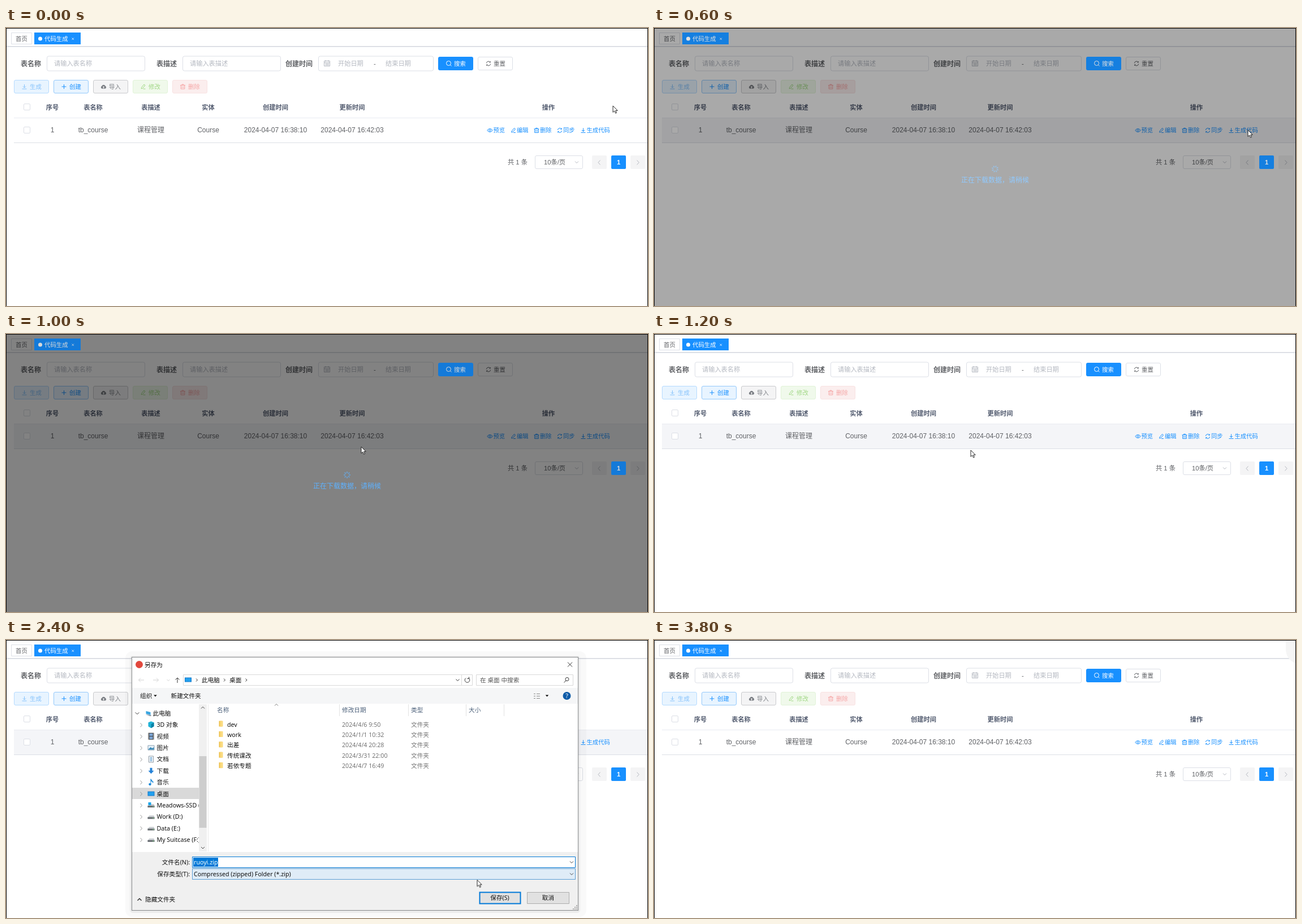
These frames come from a looping animation (1135 by 493 pixels, 4.6 s). An HTML page:

```html
<!DOCTYPE html>
<html lang="zh-CN">
<head>
<meta charset="utf-8">
<title>代码生成</title>
<style>
html, body { margin: 0; width: 100%; height: 100%; overflow: hidden; background: #fff; }
svg { display: block; width: 1135px; height: 493px; }
text { font: 11.2px "Liberation Sans", "Noto Sans CJK SC", "Noto Sans CJK", sans-serif; fill: #606266; white-space: pre; }
.m { text-anchor: middle; }
.e { text-anchor: end; }
.b { font-weight: bold; }
.s { font-size: 10.4px; }
.l { font-size: 12px; }
.ph { fill: #b4b8c0; }
.head { fill: #515a6e; font-weight: bold; }
.link text { fill: #1890ff; font-size: 10.3px; }
.w { fill: #fff; }
.ico { fill: none; stroke-width: 1; stroke: currentColor; }
.box { fill: #fff; stroke: #dcdfe6; }
#dialog text { font: 10.65px "Noto Sans", "Noto Sans CJK SC", "Noto Sans CJK", sans-serif; fill: #111; }
#dialog .dim { fill: #747474; }
#dialog .col { fill: #4c607a; }
#dialog .w { fill: #fff; }

#hover, #load, #vivid, #dialog, #pick, #twist, #combo, #save, #title, #brand, #bubble, #cursor {
  animation: 4.6s step-end infinite;
}
#hover { animation-name: hover; }
#load { animation-name: load; }
#vivid { animation-name: vivid; }
#dialog { animation-name: dialog; transform-origin: 617px 255px; }
#pick { animation-name: pick; }
#twist { animation-name: twist; }
#combo { animation-name: combo; }
#save { animation-name: save; }
#title { animation-name: title; }
#brand { animation-name: brand; }
#bubble { animation-name: bubble; }
#cursor { animation-name: cursor; }
#spin { transform-origin: 603px 250px; animation: spin 2s steps(10) infinite; }

@keyframes spin { to { transform: rotate(360deg); } }
@keyframes hover {
  0%, 78.26% { opacity: 0; }
  4.347% { opacity: 1; }
  73.913% { opacity: .5; }
}
@keyframes load {
  0%, 26.086% { opacity: 0; }
  13.043% { opacity: .48; }
  17.391% { opacity: .9; }
  21.739% { opacity: .7; }
}
@keyframes vivid {
  0%, 26.086% { filter: none; }
  13.043% { filter: brightness(.88); }
  17.391% { filter: brightness(.8); }
  21.739% { filter: brightness(.85); }
}
@keyframes dialog {
  0%, 73.913% { visibility: hidden; transform: none; }
  34.782% { visibility: visible; transform: scale(.9966); }
  39.13% { visibility: visible; transform: none; }
}
@keyframes pick { 0% { opacity: 1; } 43.478% { opacity: 0; } }
@keyframes twist {
  0%, 65.217% { opacity: 0; }
  43.478% { opacity: .6; }
  47.826% { opacity: 1; }
  56.521% { opacity: .7; }
  60.869% { opacity: .3; }
}
@keyframes combo {
  0%, 65.217% { opacity: 0; }
  52.173% { opacity: 1; }
  56.521% { opacity: .6; }
  60.869% { opacity: .2; }
}
@keyframes save {
  0% { fill: #e1e1e1; stroke: #0078d7; stroke-width: 2px; }
  56.521% { fill: #e5f1fb; stroke: #0078d7; stroke-width: 1px; }
  69.565% { fill: #cce4f7; stroke: #005499; stroke-width: 1px; }
}
@keyframes title { 0% { transform: none; } 69.565% { transform: translateX(-16px); } }
@keyframes brand { 0% { opacity: 1; } 69.565% { opacity: .08; } }
@keyframes bubble { 0% { opacity: 0; } 78.26% { opacity: 1; } }
@keyframes cursor {
  0% { transform: translate(1073px, 138px); }
  4.347% { transform: translate(1056px, 183px); }
  8.695% { transform: translate(1050px, 181px); }
  17.391% { transform: translate(850px, 190px); }
  21.739% { transform: translate(628px, 200px); }
  26.086% { transform: translate(560px, 206px); }
  30.434% { transform: translate(480px, 208.5px); }
  39.13% { transform: translate(500px, 230px); }
  43.478% { transform: translate(560px, 300px); }
  47.826% { transform: translate(684px, 379px); }
  52.173% { transform: translate(833px, 425.5px); opacity: 1; }
  56.521% { transform: translate(867px, 453px); }
  65.217% { transform: translate(867px, 457px); opacity: 1; }
  73.913%, 100% { transform: translate(867px, 457px); opacity: 0; }
}
</style>
</head>
<body>
<svg viewBox="0 0 1135 493">
  <defs>
    <clipPath id="treeClip"><path d="M223 114H341V375H223Z"/></clipPath>
    <g id="down" class="ico"><path d="M0-4V2M-2.5-.5L0 2L2.5-.5M-4 4H4"/></g>
    <g id="pen" class="ico"><path d="M-3 1.5L1.5-4L3.5-2.3L-1 3L-3.3 3.5ZM0 4H4"/></g>
    <g id="bin" class="ico"><path d="M-4.5-2.5H4.5M-3.3-2.5V4H3.3V-2.5M-1.5-2.5V-4H1.5V-2.5M-1.2-.5V2.3M1.2-.5V2.3"/></g>
    <g id="sync" class="ico"><path d="M-3.6-.6A3.6 3.6 0 0 1 3-2.3M3.3-4V-2H1.3M3.6.6A3.6 3.6 0 0 1-3 2.3M-3.3 4V2H-1.3"/></g>
    <g id="eye" class="ico"><path d="M-4.8 0Q0-6 4.8 0Q0 6-4.8 0Z"/><circle r="1.6"/></g>
    <path id="chev" d="M-3-1.5L0 1.5L3-1.5" class="ico"/>
    <path id="tri" d="M-2.8-1.5H2.8L0 1.6Z"/>
    <g id="screen"><path d="M-6-4H6V4H-6Z" fill="#1479c9"/><path d="M-5-3H5V3H-5Z" fill="#22a0ee"/></g>
    <g id="folder"><path d="M-3.5-5H2V5H-3.5Z" fill="#eec14f"/><path d="M-1.5-5H3.5V5H-1.5Z" fill="#fbdb80"/></g>
    <g id="drive"><path d="M-6 1L-3-2H5L6 1V4H-6Z" fill="#c8ccd0"/><path d="M-6 1H6V4H-6Z" fill="#666b70"/><path d="M3 2.5H5" stroke="#8ff08f"/></g>
    <g id="pc"><path d="M-4-4L4-2V3L-4 1Z" fill="#39a5e0"/><path d="M-5 2L3 5H5V3" fill="#8c98a4"/></g>
    <g id="cube"><path d="M0-6L5-4V3L0 6L-5 3V-4Z" fill="#20b2d6"/><path d="M0-1L5-4V3L0 6Z" fill="#0c80a4"/></g>
    <g id="film"><path d="M-5-6H5V6H-5Z" fill="#333"/><path d="M-3-5H3V-.5H-3ZM-3 .5H3V5H-3Z" fill="#7fa8d8"/><path d="M-4-5V6M4-5V6" stroke="#eee" stroke-dasharray="1"/></g>
    <g id="pic"><path d="M-5.5-4H5.5V4H-5.5Z" fill="#e7f2fa" stroke="#8aa0b0"/><path d="M-5 3L-1-1L2 1L5-1V3.5H-5Z" fill="#3c8ab8"/></g>
    <g id="doc"><path d="M-4-5.5H4V5.5H-4Z" fill="#fff" stroke="#8a97a3"/><path d="M-2-3H2M-2-1H2M-2 1H2M-2 3H2" stroke="#4a90c8"/></g>
    <path id="get" d="M-2-5H2V0H5L0 5.5L-5 0H-2Z" fill="#2683d8"/>
    <path id="note" d="M-1-6H0Q1-3 4-1Q4 1 3 2Q3-1 0-2V3A2.2 2 0 1 1-1 2Z" fill="#1787d9"/>
    <g id="sys"><use href="#drive"/><path d="M-5-5H0V0H-5Z" fill="#16a5ea"/></g>
  </defs>

  <rect width="1135" height="493" fill="#fff"/>
  <path d="M1 32.5H1134" stroke="#d4d7de"/><path d="M1 33.5H1134" stroke="#e7e9ee"/>
  <path d="M9.500 8.500H45.500V28.500H9.500Z" class="box"/>
  <text x="17" y="22.500" class="s">首页</text>

  <g id="form"></g>
  <g color="#b4b8c0">
    <path class="ico" d="M562.500 58.500H572.500V67.500H562.500ZM562.500 61.500H572.500M565 57V60M570 57V60M564.500 63.500H571M564.500 65.500H571"/>
    <use href="#chev" x="1009" y="238"/>
  </g>
  <text x="587" y="67" class="ph">开始日期</text>
  <text x="650" y="67">-</text>
  <text x="671" y="67" class="ph">结束日期</text>
  <rect x="834.500" y="51.500" width="61" height="23" rx="2.500" class="box"/>
  <use href="#sync" x="853" y="63" color="#606266"/>
  <text x="862" y="67" class="s">重置</text>
  <g id="tools"></g>

  <path id="hover" d="M14 160H1134V203H14Z" fill="#f4f5f8"/>
  <path d="M14 159.500H1134" stroke="#e8ebf1"/>
  <path d="M14 203.500H1134" stroke="#dcdfe5"/>
  <rect x="31.500" y="134.500" width="11" height="11" rx="1.500" class="box"/>
  <rect x="31.500" y="175.500" width="11" height="11" rx="1.500" class="box"/>
  <g id="table"></g>
  <g id="links" class="link" color="#1890ff"></g>

  <text x="887" y="242">共 1 条</text>
  <rect x="935.500" y="226.500" width="84" height="23" rx="2.500" fill="none" stroke="#dcdfe6"/>
  <text x="951" y="242">10条/页</text>
  <g fill="#f4f4f5"><rect x="1036" y="226" width="26" height="24" rx="2"/><rect x="1104" y="226" width="26" height="24" rx="2"/></g>
  <path d="M1050.500 234.500L1047 238.500L1050.500 242.500M1115.500 234.500L1119 238.500L1115.500 242.500" class="ico" color="#b4b8c0"/>

  <path id="bubble" d="M1117 1H1134V41Q1117 34 1117 16Z" fill="#f5f5f5"/>

  <g id="load">
    <rect x="1" y="1" width="1133" height="492" opacity=".7"/>
    <g id="spin" stroke="#1890ff" stroke-width="1.200"></g>
    <text x="603" y="274" class="l m" style="fill:#1890ff">正在下载数据，请稍候</text>
  </g>

  <g id="vivid">
    <path d="M50 8H132V29H50Z" fill="#1890ff"/>
    <circle cx="60.500" cy="19" r="3.500" fill="#fff"/>
    <text x="68" y="22.500" class="s w">代码生成</text>
    <path d="M116.500 17.500L120 21M120 17.500L116.500 21" stroke="#fff" stroke-width=".8"/>
    <rect x="764" y="51" width="62" height="24" rx="3" fill="#1890ff"/>
    <circle cx="782.500" cy="62.500" r="4" fill="none" stroke="#fff"/>
    <path d="M785.500 65.500L787.500 67.500" stroke="#fff"/>
    <text x="792" y="67" class="s w">搜索</text>
    <rect x="1070" y="226" width="26" height="24" rx="2" fill="#1890ff"/>
    <text x="1083" y="242" class="b m w">1</text>
  </g>

  <g id="dialog">
    <rect x="211" y="20" width="815" height="471" rx="12" opacity=".025"/>
    <rect x="219" y="28" width="796" height="456" rx="5" opacity=".05"/>
    <rect x="222.500" y="30.500" width="789" height="449" fill="#fff" stroke="#858789"/>
    <path d="M223 85H1011V113H223Z" fill="#f5f6f7"/>
    <path d="M223 376H1011V479H223Z" fill="#f0f0f0"/>
    <circle id="brand" cx="235.500" cy="43.500" r="6.500" fill="#e2483d"/>
    <text id="title" x="245" y="47.500">另存为</text>
    <g class="ico" color="#333">
      <path id="close" d="M993 39.500L1001 47.500M1001 39.500L993 47.500"/>
      <path d="M303 76V67M299.500 70.500L303 67L306.500 70.500"/>
      <path d="M336 68.500L338.500 71L336 73.500M385 68.500L387.500 71L385 73.500M423.500 68.500L426 71L423.500 73.500"/>
      <path d="M818 67.500A4.300 4.300 0 1 1 813 67.500M818.500 65.500V68.500H815.500"/>
      <circle cx="992" cy="69.500" r="3"/><path d="M990 72L986.500 75.500"/>
      <use href="#chev" x="798.500" y="71"/>
      <use href="#chev" x="1000" y="394"/>
      <path d="M232.500 462L236 458.500L239.500 462" stroke-width="1.500"/>
    </g>
    <path d="M244 71H234.500M238 67.500L234.500 71L238 74.500M260 71H269.500M266 67.500L269.500 71L266 74.500M284.500 70L287 72.500L289.500 70" class="ico" color="#d2d2d2"/>
    <path d="M313.500 61.500H824.500V80.500H313.500ZM805.500 62V80M831.500 61.500H1002.500V80.500H831.500Z" class="ico" color="#d9d9d9"/>
    <use href="#screen" x="322" y="70.500"/>
    <text x="346" y="74.500">此电脑</text><text x="395" y="74.500">桌面</text>
    <text x="838" y="74.500" style="fill:#555">在 桌面 中搜索</text>
    <text x="237" y="103">组织</text><use href="#tri" x="264" y="99"/>
    <text x="291.500" y="103">新建文件夹</text>
    <path d="M933 95.500H936M933 99.500H936M933 103.500H936M938 95.500H944M938 99.500H944M938 103.500H944" class="ico" color="#888"/>
    <use href="#tri" x="956.500" y="99"/>
    <circle cx="991.500" cy="99" r="7" fill="#0f5ca8"/>
    <text x="991.500" y="103" class="m w b">?</text>

    <path d="M223 262H341V282H223Z" fill="#d9d9d9"/>
    <g id="tree" clip-path="url(#treeClip)"></g>
    <g id="twist" class="ico" color="#9a9a9a"></g>
    <path d="M341 114H355V375H341Z" fill="#f0f0f0"/>
    <path d="M341.500 206H354.500V333H341.500Z" fill="#cdcdcd"/>
    <path d="M345 121.500L348 118.500L351 121.500M345 367L348 370L351 367" class="ico" color="#444" stroke-width="1.300"/>
    <path d="M357.500 114V375" stroke="#e8e8e8"/>
    <path d="M589.500 114V135M711.500 114V135M813.500 114V135M880.500 114V135" stroke="#e2e2e2"/>
    <path d="M475 116.500L478 113.500L481 116.500" class="ico" color="#777"/>
    <path id="pick" d="M371 195.500H878V214H371Z" fill="#e5f3ff"/>
    <g id="files"></g>

    <text x="325" y="398" class="e">文件名(N):</text>
    <path d="M329.500 384.500H1006.500V403.500H329.500Z" fill="#fff" stroke="#0078d7"/>
    <use href="#chev" x="1000" y="394" color="#444"/>
    <path d="M331 386H375V402H331Z" fill="#0078d7"/>
    <text x="332" y="397.500" class="w">ruoyi.zip</text>
    <text x="325" y="419" class="e">保存类型(T):</text>
    <path d="M329.500 405.500H1006.500V424.500H329.500Z" fill="#e4e4e4" stroke="#b4b4b4"/>
    <path id="combo" d="M329.500 405.500H1006.500V424.500H329.500Z" fill="#dfecf7" stroke="#5b9fd6"/>
    <use href="#chev" x="1000" y="415" color="#444"/>
    <text x="332" y="419">Compressed (zipped) Folder (*.zip)</text>
    <text x="246" y="464">隐藏文件夹</text>
    <path id="save" d="M837.500 447.500H909.500V467.500H837.500Z"/>
    <text x="873" y="461" class="m">保存(S)</text>
    <path d="M921.500 447.500H995.500V467.500H921.500Z" fill="#e1e1e1" stroke="#adadad"/>
    <text x="958.500" y="461" class="m">取消</text>
    <path d="M1002 477H1010M1005 474H1010M1008 471H1010" stroke="#aaa" stroke-width="2" stroke-dasharray="2 1"/>
  </g>

  <path d="M.5.5V493M1134.500.5V493M0 .5H1135" stroke="#000" fill="none"/>
  <path id="cursor" d="M0 0V11.500L2.700 9L4.600 13.200L6.500 12.400L4.700 8.400H8.200Z" fill="#fff" stroke="#111" stroke-width=".9"/>
</svg>
<script>
const fill = (id, parts) => { document.getElementById(id).innerHTML = parts.join(''); };
const text = (x, y, s, cls = '') => `<text x="${x}" y="${y}" class="${cls}">${s}</text>`;
const icon = (name, x, y) => `<use href="#${name}" x="${x}" y="${y}"/>`;

fill('form', [
  ...[[72, 173], [312, 173], [552, 203]].map(([x, w]) =>
    `<rect x="${x + .5}" y="50" width="${w}" height="26" rx="3" class="box"/>`),
  text(26, 67.5, '表名称', 'b l'), text(266, 67.5, '表描述', 'b l'), text(494, 67.5, '创建时间', 'b l'),
  text(85, 67, '请输入表名称', 'ph'), text(325, 67, '请输入表描述', 'ph')
]);

const glyphs = {
  plus: '<path d="M-4 0H4M0-4V4" class="ico"/>',
  cloud: '<path d="M-3 3.500A2.500 2.500 0 0 1-3-1.200A3.200 3.200 0 0 1 3-1.200A2.500 2.500 0 0 1 3 3.500Z" fill="currentColor"/><path d="M0 3V0M-1.300 1L0-.4L1.300 1" stroke="#fff"/>'
};
fill('tools', [
  ['生成', 'down', '#e8f4ff', '#b5dbff', '#83c1fb'],
  ['创建', 'plus', '#e8f4ff', '#94c9fb', '#1890ff'],
  ['导入', 'cloud', '#f4f4f5', '#c9cacd', '#7d8086'],
  ['修改', 'pen', '#f0f9eb', '#e1f3d8', '#a0d785'],
  ['删除', 'bin', '#fbeeee', '#f8e2e2', '#f5a5a5']
].map(([label, name, bg, line, ink], i) => `<g transform="translate(${14 + i * 70} 92)" color="${ink}">
  <rect x=".5" y=".5" width="61" height="23" rx="2.500" fill="${bg}" stroke="${line}"/>
  <g transform="translate(18.500 12)">${glyphs[name] || icon(name, 0, 0)}</g>
  <text x="28" y="16" class="s" style="fill:${ink}">${label}</text></g>`));

fill('table', [
  [82, '序号', '1'], [154, '表名称', 'tb_course'], [256, '表描述', '课程管理'], [357.5, '实体', 'Course'],
  [476.5, '创建时间', '2024-04-07 16:38:10'], [612, '更新时间', '2024-04-07 16:42:03'], [959, '操作', '']
].map(([x, head, cell]) => text(x, 144.5, head, 'm head') + text(x, 185, cell, 'm l')));

fill('links', [
  [855.5, 'eye', '预览'], [897, 'pen', '编辑'], [938, 'bin', '删除'], [979, 'sync', '同步'], [1020.5, 'down', '生成代码']
].map(([x, name, label]) => icon(name, x, 181.5) + text(x + 6, 185, label)));

fill('spin', Array.from({ length: 8 }, (_, i) =>
  `<path d="M603 244V247" transform="rotate(${i * 45} 603 250)"/>`));

const places = [
  ['pc', '此电脑'], ['cube', '3D 对象'], ['film', '视频'], ['pic', '图片'], ['doc', '文档'], ['get', '下载'],
  ['note', '音乐'], ['screen', '桌面'], ['sys', 'Meadows-SSD (C:)'], ['drive', 'Work (D:)'],
  ['drive', 'Data (E:)'], ['drive', 'My Suitcase (F:)']
];
const rowY = i => 130 + i * 20.36;
fill('tree', places.map(([name, label], i) =>
  icon(name, i ? 256.5 : 251.5, rowY(i)) + text(i ? 266.5 : 259.5, rowY(i) + 4, label)));
fill('twist', places.map((_, i) => i
  ? `<path d="M237.500 ${rowY(i) - 3}l3 3.500l-3 3.500"/>`
  : '<path d="M228.500 128.500l3.500 3l3.500-3" stroke="#444"/>'));

fill('files', [
  ...[[373, '名称'], [594, '修改日期'], [716, '类型'], [818, '大小']].map(([x, s]) => text(x, 128, s, 'col')),
  ...[['dev', '2024/4/6 9:50'], ['work', '2024/1/1 10:32'], ['出差', '2024/4/4 20:28'],
    ['传统课改', '2024/3/31 22:00'], ['若依专题', '2024/4/7 16:49']].map(([name, date], i) => {
    const y = 153.5 + i * 18.4;
    return icon('folder', 380, y - 5) + text(391, y, name) + text(594, y, date, 'dim') + text(716, y, '文件夹', 'dim');
  })
]);
</script>
</body>
</html>
```
